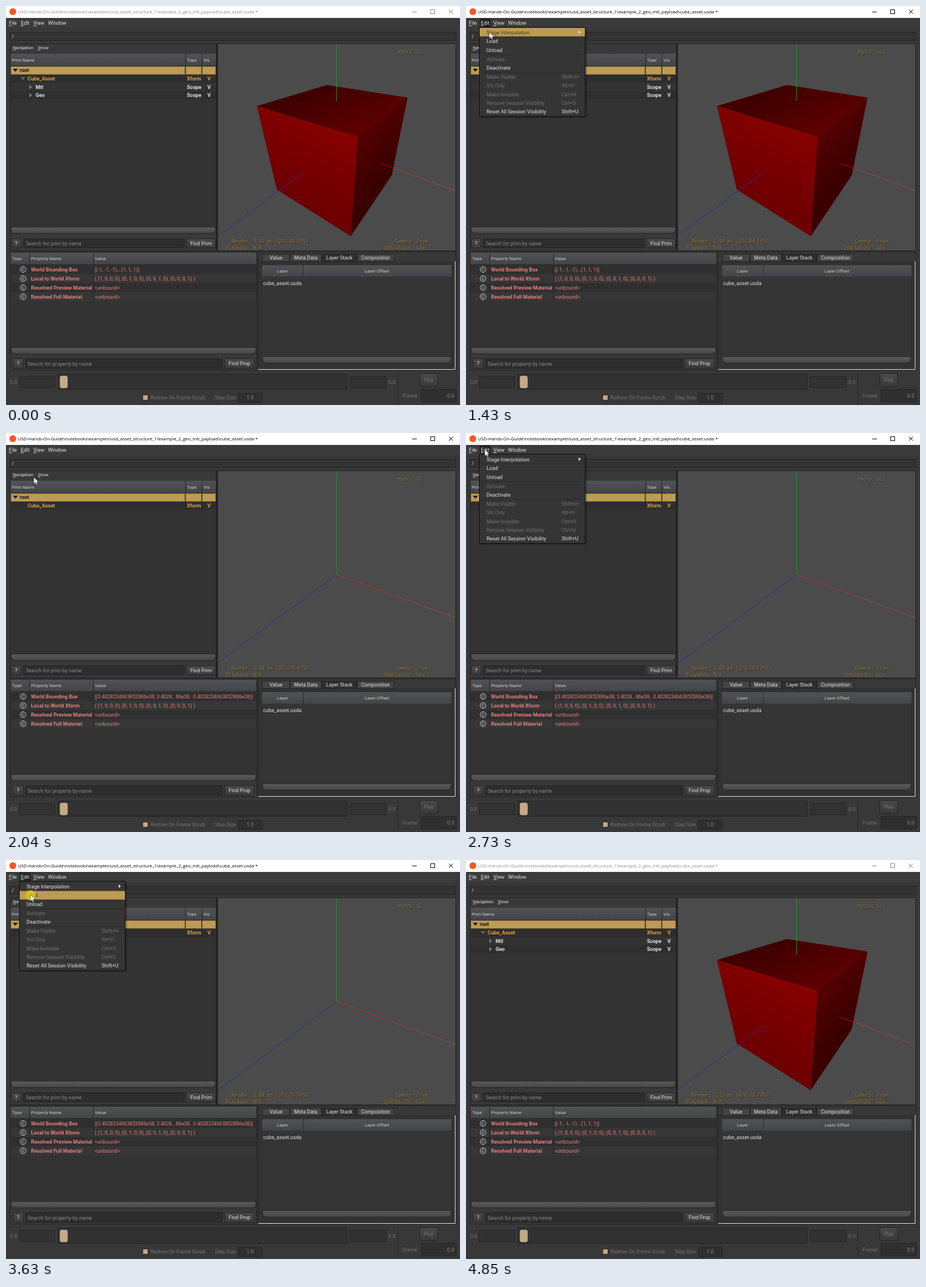
Recreate the animation shown at these times as an HTML page. Size 798 by 702 pixels, loop 5 s.

```html
<!DOCTYPE html>
<html lang="en">
<head>
<meta charset="utf-8">
<title>Payload loading</title>
<style>
  html, body { margin: 0; height: 100%; overflow: hidden; background: #383838; }
  svg { display: block; font: 9px Roboto, sans-serif; }
  text { white-space: pre; }
  .b { font-weight: 700; }
  .head { font-size: 8px; }
  .sub { font-size: 7.6px; }
  .long { font-size: 8.7px; }
  .title { font: 7.9px "Open Sans", sans-serif; }
  .hud { font: 8px "DejaVu Sans Mono", monospace; }
  .u { text-decoration: underline; }
</style>
</head>
<body>
<svg id="stage" width="798" height="702" viewBox="0 0 798 702"></svg>
<script>
const STEP = 68.4, LOOP = 5000;
const LIGHT = '#e3e3e3', DIM = '#747474', GOLD = '#bd9b54', PINK = '#e57f7c', EDGE = '#222';

const rect = (x, y, w, h, fill, extra = '') =>
  `<rect x="${x}" y="${y}" width="${w}" height="${h}" fill="${fill}" ${extra}/>`;
const path = (d, fill, extra = '') => `<path d="${d}" fill="${fill}" ${extra}/>`;
const line = (d, stroke, extra = '') => path(d, 'none', `stroke="${stroke}" ${extra}`);
// y is the middle of the capital letters
const text = (x, y, s, fill = LIGHT, cls = '', anchor = 'start') =>
  `<text x="${x}" y="${y + 3.2}" fill="${fill}" class="${cls}" text-anchor="${anchor}">${s}</text>`;
const header = (x, y, s, anchor) => text(x, y - .3, s, '#cfcfcf', 'head', anchor);
const group = (id, body, extra = '') => `<g id="${id}" ${extra}>${body}</g>`;
const key = s => `<tspan class="u">${s[0]}</tspan>${s.slice(1)}`;
const box = (x, y, w, h, fill = '#2d2d2d') =>
  rect(x + .5, y + .5, w - 1, h - 1, fill, `stroke="${EDGE}"`);
const button = (x, y, w, h, label, fill = LIGHT) =>
  rect(x + .5, y + .5, w - 1, h - 1, 'url(#button)', `stroke="${EDGE}" rx="1.5"`) +
  text(x + w / 2, y + h / 2, label, fill, '', 'middle');
const pill = (x, y, w) =>
  path(`M${x} ${y}h${w}v4q0 7-7 7h${14 - w}q-7 0-7-7z`, 'url(#pill)', 'stroke="#222" stroke-width=".8"');
const hud = (x, y, s, id = '') => {
  const at = (dx, fill, name) =>
    `<text ${name} x="${x + dx}" y="${y + 3 + dx}" fill="${fill}" class="hud">${s}</text>`;
  return at(.8, '#1c1a14', id && `id="${id}Shade"`) + at(0, '#a18140', id && `id="${id}"`);
};
const gradient = (id, from, to, dir = 'x1="0" y1="0" x2="0" y2="1"') =>
  `<linearGradient id="${id}" ${dir}><stop stop-color="${from}"/><stop offset="1" stop-color="${to}"/></linearGradient>`;
const between = (x1, y1, x2, y2) =>
  `gradientUnits="userSpaceOnUse" x1="${x1}" y1="${y1}" x2="${x2}" y2="${y2}"`;

const defs = '<defs>' +
  gradient('head', '#505255', '#434548') +
  gradient('button', '#494949', '#3a3a3a') +
  gradient('pill', '#5a5a5a', '#484848') +
  gradient('top', '#5c0000', '#400000', between(600, 225, 565, 140)) +
  gradient('left', '#850000', '#680000', between(600, 230, 520, 380)) +
  gradient('right', '#5a0000', '#3a0000', between(618, 210, 688, 270)) +
  '</defs>';

function titleBar() {
  return rect(0, 0, 798, 21, '#fff') + '<circle cx="12" cy="10" r="6" fill="#f0592a"/>' +
    group('title',
      `<text class="title" x="21" y="12.8">USD-Hands-On-Guide\\notebooks\\examples\\usd_asset_structure_1\\example_2_geo_mtl_payload\\cube_asset.usda *</text>` +
      path('M714 10h8v1h-8zM746 6h8v8h-8zm1 1v6h6v-6z', 'currentColor', 'fill-rule="evenodd"') +
      line('M778.5 6.5l7 7m0-7l-7 7', 'currentColor'), 'fill="currentColor"');
}

function menuBar() {
  return rect(0, 21, 798, 17, '#3b3b3b') +
    group('pressed', rect(24, 22, 19, 15, '#222')) +
    [[5, 'File'], [26, 'Edit'], [48, 'View']].map(([x, s]) => text(x, 30, key(s))).join('') +
    text(74, 30, 'Window') + box(7, 46, 784, 15, '#333') + text(10, 53.5, '/');
}

const treeRow = (x, y, name, type, fill) =>
  text(x, y, name, fill, 'b') + text(318, y, type, fill, 'b') + text(354, y, 'V', fill, 'b');

function treePanel() {
  const cell = (x, w) => rect(x + .5, 106.5, w - 1, 14, GOLD, 'stroke="#6b5a35"');
  return box(7, 66, 363, 365, '#353535') + rect(8, 67, 361, 17, '#393939') +
    text(12, 73, key('Navigation'), LIGHT, 'sub') + text(56, 73, key('Show'), LIGHT, 'sub') +
    rect(8, 84, 361, 21, 'url(#head)') +
    header(10, 95, 'Prim Name') + header(318, 95, 'Type') + header(347, 95, 'Vis') +
    rect(8, 105, 361, 284, '#333') + cell(8, 307) + cell(315, 29) + cell(344, 25) +
    rect(8, 121, 361, 14, '#2e2e2e') +
    path('M12 110.5h9l-4.5 5z', '#111') + text(24, 113, 'root', '#111', 'b') +
    treeRow(38, 128, 'Cube_Asset', 'Xform', '#dda03b') +
    group('children',
      rect(8, 150, 361, 14, '#2e2e2e') +
      path('M26 125.5h8l-4 4.5z', '#6b6b6b') + path('M41 138.5v8l5-4zM41 153v8l5-4z', '#777') +
      treeRow(52, 142.5, 'Mtl', 'Scope', LIGHT) + treeRow(52, 157, 'Geo', 'Scope', LIGHT)) +
    line('M315.5 84v51M344.5 84v51', '#282828') +
    pill(9, 389, 359) + rect(8, 402, 361, 28, '#393939') +
    button(9, 409, 18, 17, '?') + box(30, 409, 284, 17) +
    text(35, 417.5, 'Search for prim by name', '#8b8b8b') + button(317, 409, 52, 17, 'Find Prim');
}

function viewport() {
  const blue = '#2b2b9c', green = '#22972a';
  return box(370, 66, 421, 365, '#4b4b4b') + line('M371.5 67v363', '#222', 'stroke-width="2"') +
    line('M581 249L372 405', blue) +
    line('M581 67V249', green) +
    line('M581 249L686 287', '#c62a20') +
    line('M686 287L790 325', '#dc4934', 'stroke-dasharray="1.6 .8"') +
    group('cube',
      path('M441 176L564 139 706 161 618 230z', 'url(#top)') +
      path('M441 176L618 230 606 405 476 323z', 'url(#left)') +
      path('M618 230L706 161 678 298 606 405z', 'url(#right)') +
      line('M524 292L476 328', blue) +
      line('M581 138V167', green) +
      line('M658 277L686 287', '#b50d0a')) +
    hud(689, 81, 'Hydra: GL') + hud(397, 414, '', 'render') + hud(387, 424.5, 'Playback: N/A') +
    hud(684, 414, 'Camera: Free') + hud(664, 424.5, 'Complexity: Low');
}

function propertyPanel() {
  const rows = [
    ['World Bounding Box', ''],
    ['Local to World Xform', '( (1, 0, 0, 0), (0, 1, 0, 0), (0, 0, 1, 0), (0, 0, 0, 1) )'],
    ['Resolved Preview Material', '&lt;unbound&gt;'],
    ['Resolved Full Material', '&lt;unbound&gt;']
  ];
  return box(7, 432, 434, 209, '#333') + rect(8, 434, 432, 20, 'url(#head)') +
    header(11, 444.5, 'Type') + header(44, 444.5, 'Property Name') + header(156, 444.5, 'Value') +
    rows.map(([name, value], i) => {
      const y = 463.5 + 16 * i;
      return rect(8, y - 8, 432, 16, i % 2 ? '#363636' : '#2f2f2f') +
        `<circle cx="30" cy="${y}" r="5" fill="none" stroke="#ddd"/>` +
        `<text x="30" y="${y + 2.6}" font-size="7.5" fill="#eee" text-anchor="middle">C</text>` +
        text(44, y, name, PINK, 'b') + text(156, y, value, PINK);
    }).join('') +
    group('bounds', text(156, 463.5, '[(-1, -1, -1)...(1, 1, 1)]', PINK)) +
    group('noBounds', text(156, 463.5,
      '[(3.4028234663852886e38, 3.4028...86e38, -3.4028234663852886e38)]', PINK, 'long')) +
    line('M41.5 434v85M153.5 434v85', '#282828') +
    pill(9, 601, 430) + rect(8, 613, 432, 27, '#393939') +
    button(12, 620, 19, 18, '?') + box(34, 620, 347, 18) +
    text(38, 629.5, 'Search for property by name', '#8b8b8b') + button(384, 620, 53, 18, 'Find Prop');
}

function layerPanel() {
  const tab = (x, w, label, active) =>
    rect(x + .5, 436.5, w - 1, 13, active ? '#2f2f2f' : '#444', `stroke="${EDGE}"`) +
    text(x + w / 2, 443, label, LIGHT, '', 'middle');
  return box(442, 432, 349, 209, '#383838') + rect(443, 449, 346, 190, '#323232') +
    tab(450, 49, 'Value') + tab(499, 56, 'Meta Data') + tab(555, 62, 'Layer Stack', true) + tab(617, 65, 'Composition') +
    rect(450, 456, 333, 161, '#353535') + rect(450, 456, 333, 20, 'url(#head)') +
    line('M522.5 456v20M782.5 476v141', '#292929') +
    header(486, 466.5, 'Layer', 'middle') + header(652, 466.5, 'Layer Offset', 'middle') +
    text(452, 488, 'cube_asset.usda') + pill(451, 617, 331) +
    line('M443 639.5H789.5V449', '#f2f2f2');
}

function playBar() {
  return rect(0, 641, 798, 61, '#383838') +
    text(7, 661.5, '0.0', DIM) + box(23, 651, 63, 21, '#323232') +
    box(91, 647, 509, 28, '#323232') + rect(94, 650, 15, 23, '#c4a984', 'rx="4" stroke="#252525"') +
    box(605, 651, 63, 21, '#323232') + text(672, 661.5, '0.0', DIM) +
    line('M688.5 645v53', '#292929') + button(727, 646, 32, 24, 'Play', DIM) +
    text(697, 686, 'Frame:', DIM) + box(729, 674, 63, 23, '#2f2f2f') + text(788, 686, '0.0', '#888', '', 'end') +
    rect(240.5, 684.5, 9, 9, '#c4a984', 'stroke="#292929"') + text(254, 689, 'Redraw On Frame Scrub', DIM) +
    text(367, 689, 'Step Size', DIM) + box(408, 681, 43, 17, '#2f2f2f') + text(429, 689, '1.0', '#8a8a8a', '', 'middle');
}

function popup() {
  const items = [
    [46.5, 'Stage Interpolation', '', 1], [62, 'Load', '', 1], [77.5, 'Unload', '', 1],
    [93.5, 'Activate'], [109, 'Deactivate', '', 1], [125, 'Make Visible', 'Shift+H'],
    [140, 'Vis Only', 'Alt+H'], [155.5, 'Make Invisible', 'Ctrl+H'],
    [171, 'Remove Session Visibility', 'Ctrl+U'], [186, 'Reset All Session Visibility', 'Shift+U', 1]
  ];
  return group('menu',
    rect(26, 40, 187, 157, '#000', 'opacity=".2"') +
    rect(23.5, 37.5, 186, 157, '#353535', 'stroke="#0c0c0c"') +
    line('M25 54.5h184M25 86h184M25 117h184', '#2a2a2a') +
    group('hover', rect(24, -7.5, 185, 15, GOLD)) +
    items.map(([y, name, keys = '', on]) => {
      const fill = on ? LIGHT : '#727272';
      return `<g class="item">${text(36, y, name, fill)}</g>` + text(168, y, keys, fill);
    }).join('') + path('M198 43v6l4-3z', LIGHT));
}

const pointer = group('pointer',
  '<circle id="click" cx="0" cy="1" r="9" fill="#e2c90c" opacity=".8"/>' +
  path('M0 0V11.5L2.7 9 4.5 13 6.3 12.2 4.6 8.3H8.2z', '#fff', 'id="arrow" stroke="#222" stroke-width=".5"') +
  group('beam', line('M-2.5-5h2l.5.5.5-.5h2M0-5V5M-2.5 5h2l.5-.5.5.5h2', '#ddd')));

document.getElementById('stage').innerHTML = defs + rect(0, 0, 798, 702, '#383838') + titleBar() + menuBar() +
  treePanel() + viewport() + propertyPanel() + layerPanel() + playBar() + popup() + pointer;

const el = id => document.getElementById(id);
const show = (id, on) => el(id).setAttribute('visibility', on ? 'visible' : 'hidden');
const itemText = [...document.querySelectorAll('.item text')];

// pointer stops: step, x, y, easing power towards the stop
const stops = [
  [1, 651, 648], [8, 38, 85, 2.2], [14, 33, 28, 1.5], [19, 33, 28], [20, 35, 34], [21, 41, 46], [26, 49, 78, 1.6],
  [30, 49, 78], [36, 33, 29, 1.3], [43, 33, 29], [44, 33, 31], [45, 35, 40], [50, 43, 61, 1.5], [55, 43, 61],
  [60, 330, 485, -1.6], [66, 714, 690, 1.3]
];
function pointerAt(k) {
  const i = Math.max(1, stops.findIndex(s => s[0] >= k));
  const [k0, x0, y0] = stops[i - 1], [k1, x1, y1, power = 1] = stops[i];
  const p = (k - k0) / (k1 - k0);
  const e = power < 0 ? p ** -power : 1 - (1 - p) ** power;
  return [x0 + (x1 - x0) * e, y0 + (y1 - y0) * e];
}

// last entry of [step, value] that has begun
const since = (k, list) => list.filter(([from]) => k >= from).pop()[1];
const within = (k, a, b) => k >= a && k <= b;

function draw(now) {
  const k = Math.min(72, Math.floor((now % LOOP + 24) / STEP));
  el('title').setAttribute('color', within(k, 14, 70) ? '#000' : '#8c8c8c');

  const alpha = since(k, [[0, 0], [15, .13], [16, .6], [17, 1], [29, .4], [30, 0],
    [38, .13], [39, .6], [40, 1], [54, .4], [55, 0]]);
  el('menu').setAttribute('opacity', alpha);
  show('pressed', within(k, 15, 29) || within(k, 38, 55));
  show('cube', !within(k, 30, 54));
  show('children', !within(k, 30, 55));
  show('bounds', !within(k, 30, 60));
  show('noBounds', within(k, 30, 60));
  const stats = since(k, [[0, '3.42 ms (292.04'], [14, '2.99 ms (334.04'], [30, '2.68 ms (373.79'],
    [55, '2.31 ms (432.77'], [71, '2.11 ms (474.79']]);
  el('render').textContent = el('renderShade').textContent = `Render: ${stats} FPS)`;

  const visible = within(k, 1, 66);
  const [x, y] = pointerAt(Math.min(66, Math.max(1, k)));
  const beam = !alpha && y > 46 && y < 62;
  el('pointer').setAttribute('transform', `translate(${x} ${y})`);
  show('arrow', visible && !beam);
  show('beam', visible && beam);
  show('click', [14, 15, 28, 29, 37, 38, 53, 54].includes(k));

  const row = alpha && y > 42 ? (y < 54.5 ? 0 : y < 70 ? 1 : 2) : -1;
  show('hover', row >= 0);
  el('hover').setAttribute('transform', `translate(0 ${[46, 62, 77.5][row] || 0})`);
  itemText.slice(0, 3).forEach((t, i) => t.setAttribute('fill', i === row ? '#4a3c20' : LIGHT));
  requestAnimationFrame(() => draw(performance.now()));
}
draw(0);
</script>
</body>
</html>
```
